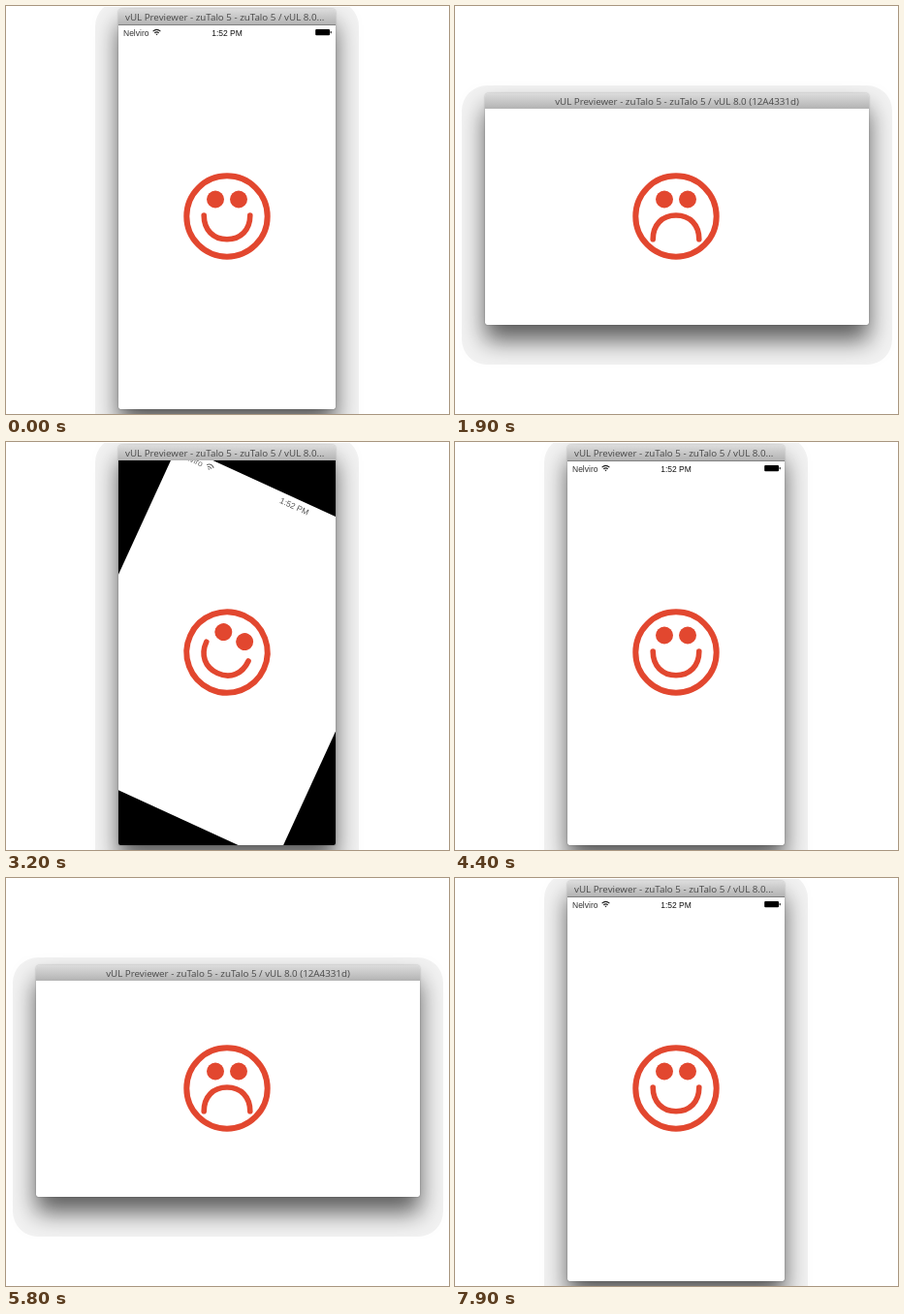
Write an HTML page that moves like this. It is 457 px wide and 421 px high and loops after 8 s.

```html
<!DOCTYPE html>
<html lang="en">
<head>
<meta charset="utf-8">
<title>Rotating face</title>
<style>
  html, body { margin: 0; width: 100%; height: 100%; overflow: hidden; background: #fff; }
  #stage { position: absolute; left: 0; top: 1px; width: 457px; height: 420px; overflow: hidden; }
  #scene { position: absolute; left: 0; top: -1px; width: 457px; height: 421px; }
  #win, #win div, #face { position: absolute; }
  #win.portrait { left: 116px; top: 3px; width: 224px; height: 413px; }
  #win.landscape { left: 31px; top: 90px; width: 396px; height: 239px; }
  #halo { inset: -8px -24px -41px; border-radius: 26px; background: #f2f2f2; }
  #shade {
    inset: 0; border-radius: 4px 4px 2px 2px;
    box-shadow: 0 16px 25px rgba(0, 0, 0, .62), 0 0 2px rgba(0, 0, 0, .3);
  }
  #bar {
    left: 0; right: 0; top: 0; height: 16px; overflow: hidden;
    border-radius: 4px 4px 0 0;
    background: linear-gradient(#dcdcdc, #b3b3b3);
    font: 9.8px/18px "Open Sans", sans-serif; color: #484848;
    white-space: pre; text-align: center;
  }
  .portrait #bar { text-align: left; text-indent: 7px; }
  #screen {
    left: 0; right: 0; top: 16px; bottom: 0; overflow: hidden;
    background: #000; border-radius: 0 0 2px 2px;
  }
  #view { left: 50%; top: 50%; background: #fff; }
  #status {
    left: 0; right: 0; top: 0; height: 16px;
    font: 8.5px/16px "Liberation Sans", Arial, sans-serif; color: #333;
    white-space: pre;
  }
  #status > * { position: absolute; top: 0; }
  #net { left: 5px; }
  #clock { left: 0; right: 0; text-align: center; color: #111; }
  #wifi { left: 34px; }
  #cell { right: 3px; }
  #face { left: 178.2px; top: 167.2px; }
</style>
</head>
<body>
<div id="stage"><div id="scene">
  <div id="win">
    <div id="halo"></div>
    <div id="shade"></div>
    <div id="bar"></div>
    <div id="screen">
      <div id="view">
        <div id="status">
          <div id="net">Nelviro</div>
          <svg id="wifi" width="12" height="16" fill="none" stroke="#222" stroke-width="1.1">
            <path d="M1.6 6.7Q5.5 3 9.4 6.7M3.2 8.4Q5.5 6.3 7.8 8.4"/>
            <path d="M4.2 9.3H6.8L5.5 10.7Z" fill="#222" stroke="none"/>
          </svg>
          <div id="clock">1:52 PM</div>
          <svg id="cell" width="18" height="16">
            <rect x=".2" y="4.5" width="14.8" height="6.2" rx="1"/>
            <rect x="15.6" y="6.4" width="1.1" height="2.4" rx=".5"/>
          </svg>
        </div>
      </div>
    </div>
  </div>
  <svg id="face" width="100" height="100" viewBox="-50 -50 100 100"
       fill="none" stroke="#e2472f" stroke-linecap="round">
    <circle r="41.7" stroke-width="6"/>
    <g fill="#e2472f" stroke="none">
      <circle cx="-12" cy="-17.5" r="9"/>
      <circle cx="12" cy="-17.5" r="9"/>
    </g>
    <path id="mouth" stroke-width="5.6"/>
  </svg>
</div></div>
<script>
const LOOP = 8000, STEP = 100, SPIN = 500, TITLE_DELAY = 150;
const LONG = 397, SHORT = 224;
const NAME = 'vUL Previewer - zuTalo 5 - zuTalo 5 / vUL 8.0';
const SMILE = 'M-23.8 -1C-23.8 14 -14.2 23.7 0 23.7S23.8 14 23.8 -1';
const FROWN = 'M-23.8 23.7C-23.8 8.7 -14.2 -1 0 -1S23.8 8.7 23.8 23.7';

// at: window turns, spin: content starts rotating
const turns = [
  { at: -1700, spin: -1590, wide: false },
  { at: 600, spin: 1049, wide: true },
  { at: 2700, spin: 2872, wide: false },
  { at: 4700, spin: 4685, wide: true },
  { at: 6300, spin: 6410, wide: false }
];

const $ = id => document.getElementById(id);
const [win, bar, view, status, face, mouth] =
  ['win', 'bar', 'view', 'status', 'face', 'mouth'].map($);
const mix = (a, b, p) => a + (b - a) * p;
const ease = x => {
  x = Math.min(1, Math.max(0, x));
  return x * x * (3 - 2 * x);
};

function render(t) {
  const { at, spin, wide } = turns.filter(k => k.at <= t).pop();
  const p = ease((t - spin) / SPIN);
  const angle = (wide ? -90 : 90) * (1 - p);
  const grow = mix(SHORT, LONG, p), shrink = mix(LONG, SHORT, p);

  win.className = wide ? 'landscape' : 'portrait';
  bar.textContent = t - at < TITLE_DELAY ? '' : NAME + (wide ? ' (12A4331d)' : '...');
  view.style.width = (wide ? grow : shrink) + 'px';
  view.style.height = (wide ? shrink : grow) + 'px';
  view.style.transform = `translate(-50%, -50%) rotate(${angle}deg)`;
  status.style.opacity = wide ? 1 - p : p;
  face.style.transform = `rotate(${angle}deg)`;
  mouth.setAttribute('d', wide ? FROWN : SMILE);
}

const start = performance.now();
function tick() {
  const t = (performance.now() - start) % LOOP;
  render(Math.floor(t / STEP) * STEP);
  requestAnimationFrame(tick);
}
tick();
</script>
</body>
</html>
```
